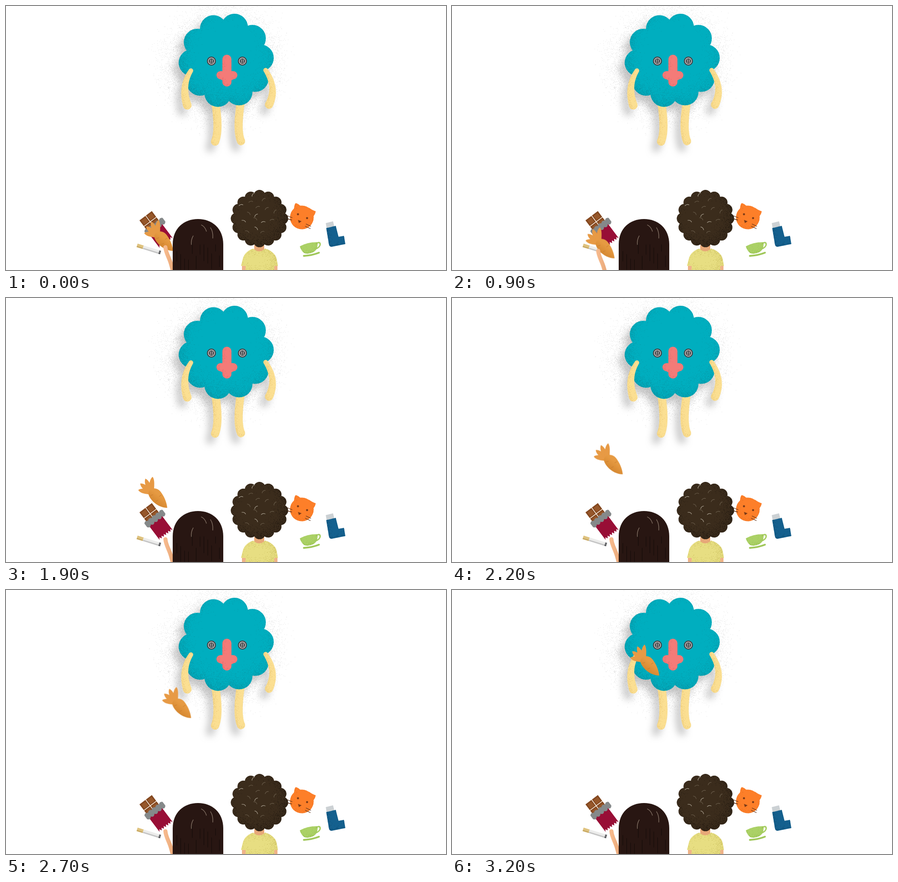
Recreate the animation shown at these times as an HTML page with a canvas. Size 966 by 580 pixels, loop 3.3 s.

```html
<!DOCTYPE html>
<html lang="en">
<head>
<meta charset="utf-8">
<title>Carrot toss</title>
<style>
html, body { margin: 0; width: 100%; height: 100%; overflow: hidden; background: #fff; }
canvas, svg { position: absolute; left: 0; top: 0; width: 966px; height: 580px; }
</style>
</head>
<body>
<canvas id="scene" width="966" height="580"></canvas>
<svg viewBox="0 0 966 580">
  <defs>
    <linearGradient id="root" x1="0.7" y1="0.1" x2="0.25" y2="0.75">
      <stop offset="0.35" stop-color="#e69a42"/><stop offset="1" stop-color="#d4862f"/>
    </linearGradient>
    <linearGradient id="skin" x1="0" x2="1">
      <stop offset="0" stop-color="#f6b98c"/><stop offset="1" stop-color="#e3a06f"/>
    </linearGradient>
  </defs>
  <g id="carrot">
    <g id="leaves" fill="#e79a45"></g>
    <path fill="url(#root)" d="M27 31C34 24 44 25 51 33C59 43 65 57 66 69C55 69 41 63 32 52C26 45 22 37 27 31Z"/>
    <path d="M29 42l6-2M40 55l6-3M53 41l-5 3" stroke="#c97c2d" fill="none"/>
  </g>
  <path id="arm" d="M350 530C351 543 358 552 362 566C366 580 372 600 378 630" fill="none"
    stroke="url(#skin)" stroke-width="9" stroke-linecap="round"/>
  <path fill="#281612" d="M366 580V524C366 488 391 468 421.500 468S477 488 477 524V580Z"/>
  <path id="strands" stroke="#130a08" fill="none"/>
  <path fill="none" stroke="#8b7a6c" stroke-width="1.300" stroke-linecap="round"
    d="M429 481Q437 485 440 495M449 487Q455 496 454 510M411 505Q406 513 407 524"/>
</svg>
<script>
const W = 966, H = 580, LOOP = 3300, STEP = 100, TAU = Math.PI * 2;
const ctx = document.getElementById('scene').getContext('2d');

let seed = 7;
const random = () => {
  seed = (seed * 1664525 + 1013904223) >>> 0;
  return seed / 4294967296;
};
const range = n => [...Array(n).keys()];

const shape = d => new Path2D(d);
const fill = (path, color) => {
  ctx.fillStyle = color;
  ctx.fill(path);
};
const line = (d, color, width) => {
  ctx.strokeStyle = color;
  ctx.lineWidth = width;
  ctx.lineCap = 'round';
  ctx.stroke(shape(d));
};
const circles = list => {
  const path = new Path2D();
  for (const [x, y, r] of list) {
    path.moveTo(x + r, y);
    path.arc(x, y, r, 0, TAU);
  }
  return path;
};
const dot = (x, y, r, color) => fill(circles([[x, y, r]]), color);

// A disc with a ring of evenly spaced lobes.
const cloud = (x, y, count, ring, r, start) => circles([[x, y, ring], ...range(count).map(i => {
  const a = start + i * TAU / count;
  return [x + ring * Math.cos(a), y + ring * Math.sin(a), r];
})]);

// A tapering limb swept along a quadratic curve.
const limb = (a, b, c, r0, r1) => circles(range(81).map(i => {
  const t = i / 80, s = 1 - t;
  const at = k => s * s * a[k] + 2 * s * t * b[k] + t * t * c[k];
  return [at(0), at(1), r0 + (r1 - r0) * t];
}));

const blurred = (path, dx, dy, blur) => c => {
  c.save();
  c.filter = `blur(${blur}px)`;
  c.translate(dx, dy);
  c.fill(path);
  c.restore();
};

// Turns a soft mask into speckles, optionally clipped to a path.
function grain(paint, rgb, strength, clip) {
  const layer = document.createElement('canvas');
  layer.width = W;
  layer.height = H;
  const c = layer.getContext('2d');
  paint(c);
  const image = c.getImageData(0, 0, W, H), px = image.data;
  for (let i = 0; i < px.length; i += 4) {
    const hit = px[i + 3] && random() < px[i + 3] / 255 * strength;
    px.set([...rgb, hit ? 170 : 0], i);
  }
  c.putImageData(image, 0, 0);
  if (clip) {
    c.globalCompositeOperation = 'destination-in';
    c.fill(clip);
  }
  ctx.drawImage(layer, 0, 0);
}
const edgeShade = (path, dx, dy, blur, rgb, strength) => grain(c => {
  c.fillRect(0, 0, W, H);
  c.globalCompositeOperation = 'destination-out';
  blurred(path, dx, dy, blur)(c);
}, rgb, strength, path);
const shaded = (path, color, dx, dy, blur, rgb, strength) => {
  fill(path, color);
  edgeShade(path, dx, dy, blur, rgb, strength);
};

function drawCreature() {
  const body = cloud(483.500, 119.300, 10, 75, 29.500, -76 * TAU / 360);
  const legs = [limb([460, 214], [469, 274], [459, 298], 9, 9), limb([515, 214], [506, 274], [516, 297], 9, 9)];
  const arms = [limb([406, 142], [384, 176], [398, 218], 5, 9.500), limb([570, 141], [596, 180], [577.500, 217], 5, 9)];
  const whole = new Path2D(body);
  for (const part of [...legs, ...arms]) whole.addPath(part);

  grain(blurred(body, -9, 10, 28), [212, 212, 212], .55);
  ctx.fillStyle = 'rgba(120, 120, 120, .4)';
  blurred(whole, -11, 14, 8)(ctx);
  for (const leg of legs) shaded(leg, '#fbdf92', 4, -2, 4, [232, 198, 115], .6);
  shaded(body, '#00aebf', 5, -6, 7, [6, 143, 158], .55);
  edgeShade(body, 3, -18, 18, [6, 150, 165], .4);
  for (const arm of arms) shaded(arm, '#fbdf92', 4, -2, 4, [232, 198, 115], .6);

  const nose = new Path2D();
  nose.roundRect(475, 107, 20, 70, 10);
  nose.roundRect(462, 143, 46, 18, 9);
  nose.roundRect(470, 143, 30, 20, 5);
  shaded(nose, '#f47b78', 3, -3, 4, [228, 102, 104], .5);

  for (const x of [451, 519]) {
    dot(x, 121, 10, '#45464b');
    dot(x, 121, 7.500, '#d9d5d2');
    dot(x, 121, 6, '#45464b');
    for (const dx of [-2, 2]) for (const dy of [-2, 2]) dot(x + dx, 121 + dy, 1.200, '#d9d5d2');
  }
}

function drawSnacks() {
  ctx.save();
  ctx.translate(293, 471);
  ctx.transform(.8, -.6, .6, .8, 0, 0);
  for (const x of [0, 17]) for (const y of [0, 17]) {
    fill(shape(`M${x} ${y}h17v17h-17Z`), '#83471f');
    fill(shape(`M${x + 3} ${y + 3}h11v11h-11Z`), '#96572a');
  }
  line('M17 0V33M0 16.500H34', '#f4e7d8', 1.600);
  fill(shape('M-1 32H35V75' + 'l-3 -5l-3 5'.repeat(6) + 'Z'), '#980e36');
  fill(shape('M-6 26' + 'q5 -5 10 0'.repeat(5) + 'v10' + 'q-5 7 -10 0'.repeat(5) + 'Z'), '#85898a');
  ctx.restore();

  ctx.save();
  ctx.translate(289, 522);
  ctx.rotate(.3);
  for (const [x, end, top, low] of [[0, 14, '#dfc27e', '#c9a95f'], [14, 50, '#ececeb', '#c5c5c5'], [50, 54, '#66676a', '#55565a']]) {
    fill(shape(`M${x} 0H${end}V5H${x}Z`), top);
    fill(shape(`M${x} 5H${end}V8H${x}Z`), low);
  }
  ctx.restore();
}

function drawBoy() {
  fill(shape('M545 525H567V536Q556 545 545 536Z'), '#e7a878');
  fill(shape('M518 566H527V580H518ZM587 566H596V580H587Z'), '#efb388');
  const shirt = shape('M543 533Q556 545 569 533C583 537 592 546 594 555L597 571H589V580H526V571H516L520 555C523 544 531 537 543 533Z');
  shaded(shirt, '#e7de82', -9, 0, 9, [200, 187, 90], .5);

  const hair = cloud(556.500, 467, 16, 50, 13, -TAU / 4);
  shaded(hair, '#3b2c1c', -8, -8, 12, [31, 22, 14], .55);
  ctx.lineWidth = 1.100;
  for (const i of range(16)) {
    const a = i * 2.400, d = 12 * Math.sqrt(i), start = 3 + random() * 1.800;
    ctx.beginPath();
    ctx.arc(553 + d * Math.cos(a), 464 + d * Math.sin(a), 7, start, start + 1.500);
    ctx.strokeStyle = i % 3 ? '#6b5e4c' : '#b0a797';
    ctx.stroke();
  }
}

function drawToys() {
  const head = circles([[649.500, 464.500, 26]]);
  head.addPath(shape('M632 452Q632 437 636 433Q642 434 648 441ZM665 443Q673 449 680 451Q679 458 672 466Z'));
  shaded(head, '#fd7f29', 3, -4, 6, [236, 111, 30], .4);
  dot(641, 457.500, 2.300, '#7b3b18');
  dot(661, 466, 2.300, '#7b3b18');
  fill(shape('M641 470L649 473L643 477Z'), '#7b3b18');
  line('M618 461L628 465M619 468L627 470M659 479L669 484M657 484L668 489', '#60331c', 1.300);

  line('M681 522C691 514 695 529 679 534', '#a6cd60', 3);
  const cup = shape('M645 528Q663 518 684 519C685 530 681 538 674 541Q664 546 655 543Q648 538 645 528Z');
  shaded(cup, '#abd166', -3, -3, 5, [150, 190, 80], .5);
  line('M654 549Q672 548 687 542', '#a0c75a', 4);

  fill(shape('M702 477L718 473L721 485L704 488Z'), '#ccd1d4');
  const inhaler = shape('M703 488L724 483L730 507L742 505L745 523L715 529Q710 529 709 524Z');
  shaded(inhaler, '#14608e', 3, -3, 5, [14, 76, 115], .5);
}

drawCreature();
drawSnacks();
drawBoy();
drawToys();

document.getElementById('strands').setAttribute('d', range(12).map(i =>
  `M${375 + i * 8.500} ${510 + random() * 50}v${14 + random() * 24}`).join(''));

document.getElementById('leaves').innerHTML = range(4).map(i => {
  const length = 29 + 1.500 * i;
  return `<path transform="translate(31 34) rotate(${188 + i * 29})"
    d="M0 -6C${length * .4} -6 ${length * .8} -7 ${length} 0C${length * .8} 6 ${length * .4} 5 0 6Z"/>`;
}).join('');

// Smooth interpolation through [time, x, y] points without overshoot.
function sample(track, t, axis) {
  const rate = i => (track[i + 1][axis] - track[i][axis]) / (track[i + 1][0] - track[i][0]);
  const last = track.length - 1;
  const slope = i => {
    const a = rate(Math.max(i - 1, 0)), b = rate(Math.min(i, last - 1));
    return a * b <= 0 ? 0 : 2 * a * b / (a + b);
  };
  let i = 0;
  while (i < last - 1 && t >= track[i + 1][0]) i++;
  const span = track[i + 1][0] - track[i][0], u = (t - track[i][0]) / span, v = 1 - u;
  return v * v * (1 + 2 * u) * track[i][axis] + u * u * (3 - 2 * u) * track[i + 1][axis] +
    span * u * v * (v * slope(i) - u * slope(i + 1));
}

function play(id, track) {
  const frames = range(LOOP / STEP + 1).map(i => {
    const t = Math.min(i * STEP, LOOP - STEP);
    return {
      offset: i * STEP / LOOP,
      easing: 'step-end',
      transform: `translate(${sample(track, t, 1)}px, ${sample(track, t, 2)}px)`
    };
  });
  document.getElementById(id).animate(frames, { duration: LOOP, iterations: Infinity });
}

// Wind up, throw, then fly.
play('carrot', [[0, 301, 469], [500, 294, 481], [1400, 286, 488], [1650, 270, 440],
  [1900, 288, 392], [2500, 329, 247], [3000, 360, 163], [3200, 389, 119]]);
play('arm', [[0, 0, 0], [500, -21, 8], [1400, -34, 7], [1900, 0, 0], [3200, 0, 0]]);
</script>
</body>
</html>
```
